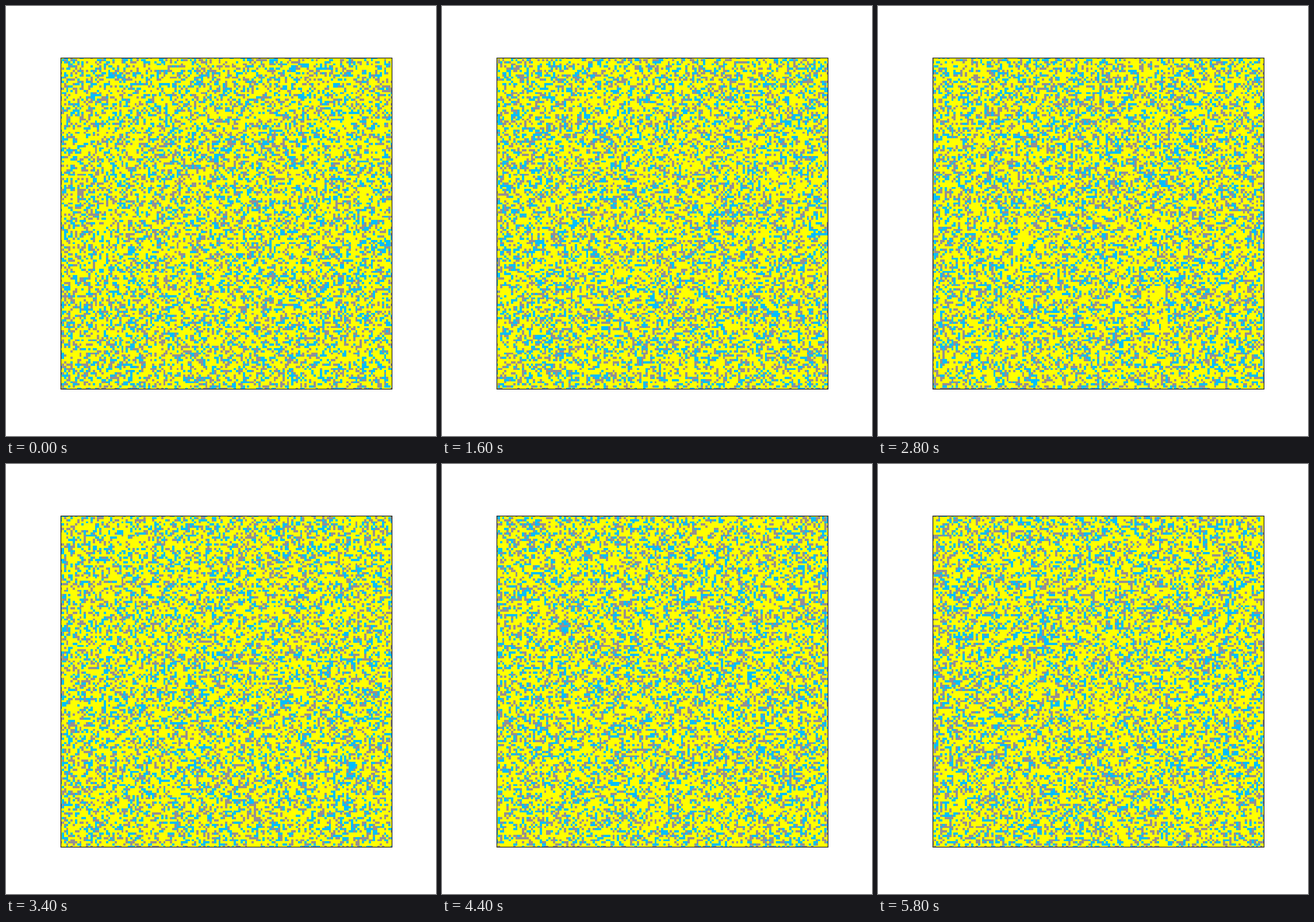
These frames come from a looping animation (748 by 748 pixels, 6000 ms). A matplotlib script:

```python
import numpy as np
import matplotlib.pyplot as plt
from matplotlib.animation import FuncAnimation
from matplotlib.colors import ListedColormap

SIZE = 748
DPI = 88
CELLS = 151          # the outermost cells are cut in half by the frame
FRAMES = 30
INTERVAL = 200
LINE = 1.11 * 72 / DPI
YELLOW, BLUE, GREY = range(3)
COLORS = ["#ffff00", "#00bfff", "#969090"]


def lattice(step):
    """Random population: slightly clumped blue, scattered grey, rest yellow."""
    rng = np.random.default_rng(1000 + step)
    noise = rng.normal(size=(CELLS, CELLS))
    near = sum(np.roll(noise, d, axis) for d in (-1, 1) for axis in (0, 1))
    field = noise + 0.04 * near
    grid = np.full((CELLS, CELLS), YELLOW)
    grid[rng.random(grid.shape) < 0.25] = GREY
    grid[field > np.quantile(field, 0.8)] = BLUE
    return grid


fig, ax = plt.subplots(figsize=(SIZE / DPI, SIZE / DPI), dpi=DPI,
                       facecolor="white")
fig.subplots_adjust(left=0.125, right=0.9, bottom=0.11, top=0.88)
image = ax.imshow(lattice(0), cmap=ListedColormap(COLORS), vmin=0, vmax=2,
                  interpolation="nearest")
ax.set(xlim=(0, CELLS - 1), ylim=(CELLS - 1, 0), xticks=[], yticks=[])
for spine in ax.spines.values():
    spine.set_linewidth(LINE)


def update(frame):
    # the opening state is held for two ticks
    image.set_data(lattice(max(frame - 1, 0)))
    return [image]


anim = FuncAnimation(fig, update, frames=FRAMES, interval=INTERVAL,
                     repeat=True, repeat_delay=0, blit=False)
plt.show()
```
